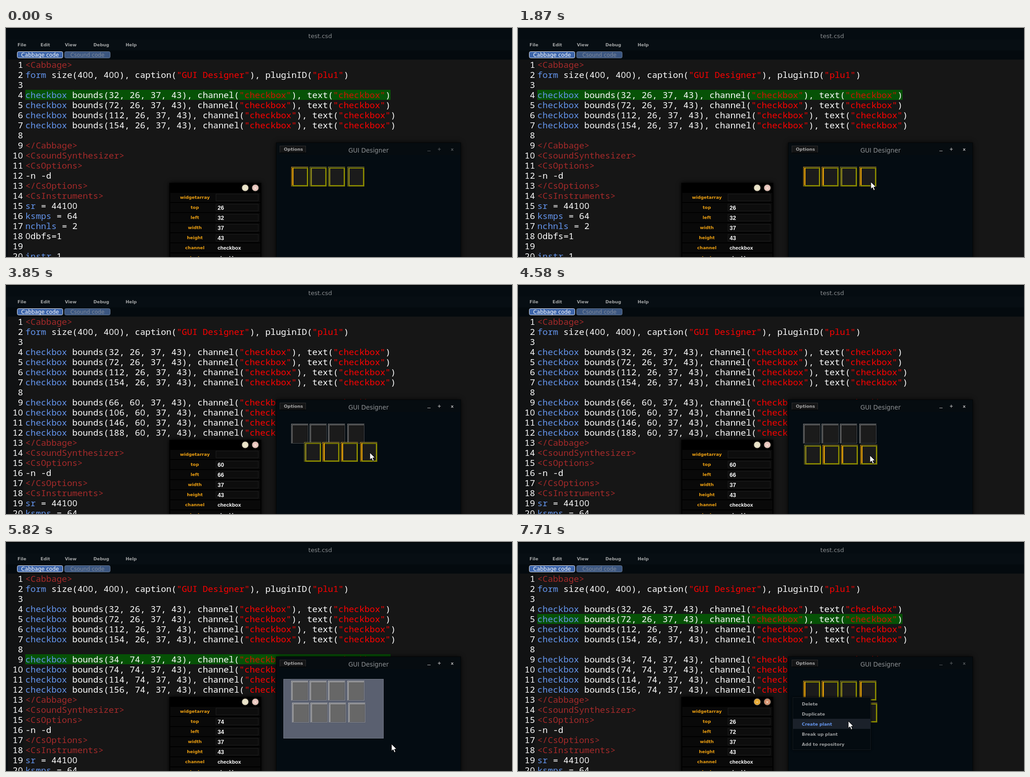
Animation, 1100 px wide and 500 px high, one loop 8 s. Source, as an HTML page with a canvas:

```html
<!DOCTYPE html>
<html lang="en">
<head>
<meta charset="utf-8">
<title>GUI Designer</title>
<style>
html, body { margin: 0; width: 100%; height: 100%; overflow: hidden; background: #161616; }
canvas { display: block; width: 1100px; height: 500px; }
</style>
</head>
<body>
<canvas id="stage" width="1100" height="500"></canvas>
<script>
const ctx = document.getElementById('stage').getContext('2d');
const LOOP = 8000;
const SANS = '"DejaVu Sans", sans-serif';
const BOLD = 'bold 9.4px ' + SANS;
const MONO = '18.9px "Noto Sans Mono", monospace';
const ROUND_ZERO = '18.9px "Open Sans", sans-serif';
const CELL = 11.343, ROW = 22, CODE_X = 42, CODE_Y = 69;
const WIN = { x: 588, y: 251, w: 400, h: 260 };
const ORIGIN = { x: 588, y: 277 };
const OFFSETS = [0, 40, 80, 122];

// Pointer path: time, x, y
const PATH = [
  [460, 836, 423], [540, 799, 405], [800, 799, 405], [1000, 684, 330],
  [1130, 604, 297], [1200, 604, 297], [1400, 812, 405], [1590, 766, 348],
  [1630, 766, 348], [1870, 767, 336], [2390, 767, 336], [2550, 719, 363],
  [3340, 719, 363], [3500, 797, 360], [3680, 797, 360], [3850, 791, 366],
  [4100, 761, 374], [4350, 766, 371], [4540, 766, 371], [4580, 765, 372],
  [4700, 765, 374], [4850, 765, 374], [5300, 624, 314], [5350, 624, 314],
  [5510, 602, 298], [5690, 602, 298], [5780, 821, 429], [5820, 838, 441],
  [5870, 840, 443], [6000, 840, 443], [6330, 766, 339], [6850, 766, 339],
  [7100, 752, 362], [7300, 734, 382], [7610, 722, 391], [7709, 722, 391],
  [7710, 718, 391]
];
const LASSOS = [[1200, 1430], [5690, 6010]];
const MENUS = [[2160, 3070], [6600, LOOP]];
const PANEL_FOCUS = [[2250, 3070], [4750, 5690], [6690, LOOP]];
const ITEMS = ['Delete', 'Duplicate', 'Create plant', 'Break up plant', 'Add to repository'];

// Selected code line and the values shown for it
const STATES = [
  { at: 0, line: 4, top: 26, left: 32 },
  { at: 2250, line: 5, top: 26, left: 72 },
  { at: 3160, line: 0, top: 60, left: 66 },
  { at: 4750, line: 9, top: 74, left: 34 },
  { at: 6690, line: 5, top: 26, left: 72 }
];

const within = (t, spans) => spans.find(([a, b]) => t >= a && t < b);

function pointer(t) {
  let i = PATH.findIndex(k => k[0] > t);
  if (i < 0) i = PATH.length;
  const a = PATH[Math.max(i - 1, 0)], b = PATH[Math.min(i, PATH.length - 1)];
  const p = b[0] > a[0] ? (t - a[0]) / (b[0] - a[0]) : 0;
  return { x: a[1] + (b[1] - a[1]) * p, y: a[2] + (b[2] - a[2]) * p };
}

function rect(x, y, w, h, color) {
  ctx.fillStyle = color;
  ctx.fillRect(x, y, w, h);
}

function frame(x, y, w, h, color) {
  ctx.strokeStyle = color;
  ctx.lineWidth = 1;
  ctx.strokeRect(x + .5, y + .5, w - 1, h - 1);
}

function label(str, x, y, color, font, align = 'left') {
  ctx.font = font;
  ctx.textAlign = align;
  ctx.fillStyle = color;
  ctx.fillText(str, x, y);
}

function shadowed(blur, draw) {
  ctx.save();
  ctx.shadowColor = '#000';
  ctx.shadowBlur = blur;
  draw();
  ctx.restore();
}

// Monospaced run with an unslashed zero
function mono(str, x, y, color) {
  for (const part of str.match(/0|[^0]+/g) || []) {
    if (part === '0') label(part, x + .27, y, color, ROUND_ZERO);
    else label(part, x, y, color, MONO);
    x += part.length * CELL;
  }
}

const checkboxLine = (x, y) =>
  `checkbox bounds(${x}, ${y}, 37, 43), channel("checkbox"), text("checkbox")`;

function source(t) {
  const lines = ['<Cabbage>', 'form size(400, 400), caption("GUI Designer"), pluginID("plu1")', ''];
  OFFSETS.forEach(d => lines.push(checkboxLine(32 + d, 26)));
  lines.push('');
  if (t >= 3160) {
    const [x, y] = t < 4750 ? [66, 60] : [34, 74];
    OFFSETS.forEach(d => lines.push(checkboxLine(x + d, y)));
  }
  return lines.concat('</Cabbage>', '<CsoundSynthesizer>', '<CsOptions>', '-n -d', '</CsOptions>',
    '<CsInstruments>', 'sr = 44100', 'ksmps = 64', 'nchnls = 2', '0dbfs=1', '', 'instr 1');
}

function tokenColor(tok, lit) {
  if (tok[0] === '<') return '#a52a2a';
  if (tok[0] === '"') return lit ? '#d01400' : '#ff0000';
  return /^(form|checkbox|sr|ksmps|nchnls|instr)$/.test(tok) ? '#6495ed' : '#ffffff';
}

function drawCode(t, state) {
  rect(0, 68, 1100, 432, '#161616');
  rect(0, 68, 38, 432, '#111213');
  rect(0, 68, 4, 432, '#070c10');
  source(t).slice(0, 20).forEach((line, i) => {
    const top = CODE_Y + i * ROW, base = top + 18, lit = state.line === i + 1;
    if (lit) rect(CODE_X, top, 794, ROW, '#065206');
    const num = String(i + 1);
    mono(num, 37 - num.length * CELL, base, '#ffffff');
    let x = CODE_X;
    for (const tok of line.match(/<[^>]*>|"[^"]*"|[a-z]+|[^a-z"<]+/gi) || []) {
      mono(tok, x, base, tokenColor(tok, lit));
      x += tok.length * CELL;
    }
  });
}

function tab(x, str, fill, edge, color) {
  ctx.beginPath();
  ctx.roundRect(x + .5, 51.5, 99, 14, 3);
  ctx.fillStyle = fill;
  ctx.fill();
  ctx.strokeStyle = edge;
  ctx.lineWidth = 1;
  ctx.stroke();
  label(str, x + 50, 63, color, '11.45px ' + SANS, 'center');
}

function drawHeader() {
  rect(0, 0, 1100, 25, '#050c11');
  rect(0, 0, 1100, 2, '#020507');
  rect(0, 25, 1100, 24, '#070e13');
  rect(0, 49, 1100, 20, '#040a0e');
  label('test.csd', 683, 22, '#8b8f92', '13px ' + SANS, 'center');
  [['File', 25], ['Edit', 75], ['View', 128], ['Debug', 190], ['Help', 260]]
    .forEach(([str, x]) => label(str, x, 40, '#a3a5a6', BOLD));
  tab(24, 'Cabbage code', '#3d65aa', '#e4e8ee', '#ffffff');
  tab(127, 'Csound code', '#3b5680', '#65768e', '#808b9b');
}

function roundButton(x, fill, mark) {
  ctx.beginPath();
  ctx.arc(x, 349, 7, 0, Math.PI * 2);
  ctx.fillStyle = fill;
  ctx.fill();
  ctx.strokeStyle = '#9a9080';
  ctx.lineWidth = 1;
  ctx.stroke();
  label(mark, x, 352.5, 'rgba(255,245,225,.8)', 'bold 10px ' + SANS, 'center');
}

function drawPanel(t, state) {
  shadowed(9, () => rect(355, 338, 200, 180, '#000000'));
  const active = within(t, PANEL_FOCUS);
  roundButton(520, active ? '#e5a935' : '#e9e3c8', '–');
  roundButton(542, active ? '#cf8a68' : '#e8c3bd', '×');
  const rows = [['widgetarray', ''], ['top', state.top], ['left', state.left], ['width', 37],
    ['height', 43], ['channel', 'checkbox'], ['text', 'checkbox']];
  rows.forEach(([name, value], i) => {
    const y = 359 + i * ROW;
    rect(357, y + 1, 196, 20, '#090909');
    if (i < 5) {
      rect(456, y + 3, 93, 16, '#0d0d0d');
      frame(456, y + 3, 93, 16, '#1d1d1d');
    }
    label(name, 410.5, y + 14, '#eda012', 'bold 9.5px ' + SANS, 'center');
    const size = i < 5 ? 12.5 : 11;
    label(String(value), 460, y + (i < 5 ? 15.5 : 14.5), '#ffffff',
      `bold ${size}px "Liberation Sans", Arial, sans-serif`);
  });
}

function checkbox(x, y, selected, hot, lit) {
  const w = 37, h = 43;
  rect(x, y, w, h, lit ? '#555760' : '#0a0d0f');
  rect(x + 3, y + 3, w - 5, h - 5, lit ? '#676767' : '#1b1b1b');
  if (selected) {
    const olive = '#858500', edge = hot ? '#dc9a08' : '#85801c';
    rect(x, y, w, 1, hot ? '#c4a03c' : '#8f8c45');
    rect(x, y, 1, h, edge);
    rect(x + 2, y + 2, w - 2, 2, olive);
    rect(x + 2, y + 2, 3, h - 2, edge);
    rect(x + w - 3, y + 2, 3, h - 2, olive);
    rect(x + 2, y + h - 3, w - 2, 3, olive);
    return;
  }
  const bright = lit ? '#c2c2c2' : '#8c8c8c', dim = lit ? '#8a8a8a' : '#565656';
  rect(x, y, w, 1, bright);
  rect(x, y, 1, h, bright);
  rect(x + 2, y + 2, w - 3, 1, bright);
  rect(x + 2, y + 2, 1, h - 3, bright);
  rect(x + w - 1, y + 2, 1, h - 2, dim);
  rect(x + 2, y + h - 1, w - 2, 1, dim);
}

function drawBoxes(t, lit) {
  const lasso = within(t, LASSOS);
  const first = !lasso && (t < 3160 || t > 6010);
  OFFSETS.forEach((d, i) => {
    const hot = i === 0 || (i === 1 && t > 980) || (i === 3 && t > 1650);
    checkbox(ORIGIN.x + 32 + d, ORIGIN.y + 26, first, hot, lit);
  });
  if (t < 3160) return;
  let x = ORIGIN.x + 66, y = ORIGIN.y + 60;
  if (t >= 3680) {
    const grip = pointer(Math.min(t, 4700));
    x = Math.round(grip.x - 143);
    y = Math.round(grip.y - 23);
  }
  OFFSETS.forEach((d, i) => {
    const hot = i === 1 || (i > 1 && t > 3340 + i * 40);
    checkbox(x + d, y, !lasso, hot, lit);
  });
}

function drawLasso(t) {
  const span = within(t, LASSOS);
  if (!span) return;
  const a = pointer(span[0]), b = pointer(Math.max(span[0], t - 40));
  const x = Math.round(a.x) + 1, y = Math.round(a.y) + 1;
  const w = Math.round(b.x) - x, h = Math.round(b.y) - y;
  if (w < 2 || h < 2) return;
  ctx.save();
  ctx.beginPath();
  ctx.rect(x, y, w, h);
  ctx.clip();
  rect(x, y, w, h, '#5a6070');
  drawBoxes(t, true);
  ctx.restore();
  frame(x, y, w, h, '#717784');
}

function drawWindow(t) {
  shadowed(10, () => rect(WIN.x, WIN.y, WIN.w, WIN.h, '#040c12'));
  rect(WIN.x, WIN.y, WIN.w, 26, '#060c10');
  frame(WIN.x - 1, WIN.y - 1, WIN.w + 2, WIN.h, '#020405');
  rect(595, 257, 57, 16, '#141516');
  frame(595, 257, 57, 16, '#2c2c2d');
  rect(595, 272, 58, 1, '#000000');
  label('Options', 604, 268, '#a6a6a6', 'bold 9.5px ' + SANS);
  label('GUI Designer', 788, 272, '#8e9295', '13.3px ' + SANS, 'center');
  const focused = t >= 1130 && !within(t, PANEL_FOCUS);
  const tint = focused ? '#b4b4b4' : '#55595c';
  rect(916, 268, 7, 1, tint);
  label('+', 942, 268, tint, 'bold 10px ' + SANS, 'center');
  label('x', 970, 268, tint, 'bold 9.5px ' + SANS, 'center');
  drawBoxes(t, false);
  drawLasso(t);
}

function drawMenu(t) {
  const span = within(t, MENUS);
  if (!span) return;
  const corner = pointer(span[0]), at = pointer(t);
  const x = corner.x - 169, y = corner.y;
  shadowed(4, () => rect(x, y, 170, 115, '#040b10'));
  frame(x, y, 170, 115, '#151b20');
  const hover = at.x < corner.x - 1 ? Math.floor((at.y - y - 3) / ROW) : -1;
  ITEMS.forEach((str, i) => {
    const top = y + 3 + i * ROW;
    if (i === hover) rect(x + 1, top, 168, ROW, '#1b212a');
    label(str, x + 20, top + 15, i === hover ? '#6495ed' : '#9b9d9e', BOLD);
  });
}

function drawPointer(t) {
  if (t < PATH[0][0]) return;
  const { x, y } = pointer(t);
  ctx.beginPath();
  [[0, 0], [0, 15.5], [3.6, 12.2], [6.3, 18.5], [9, 17.3], [6.4, 11.4], [11, 11]]
    .forEach(([dx, dy]) => ctx.lineTo(Math.round(x) + dx, Math.round(y) + dy));
  ctx.closePath();
  ctx.fillStyle = '#ffffff';
  ctx.fill();
  ctx.strokeStyle = '#000000';
  ctx.lineWidth = 1;
  ctx.stroke();
}

function render(t) {
  const state = STATES.filter(s => s.at <= t).pop();
  drawCode(t, state);
  drawHeader();
  drawPanel(t, state);
  drawWindow(t);
  drawMenu(t);
  drawPointer(t);
}

const start = performance.now();
function tick() {
  render((performance.now() - start) % LOOP);
  requestAnimationFrame(tick);
}
tick();
</script>
</body>
</html>
```
